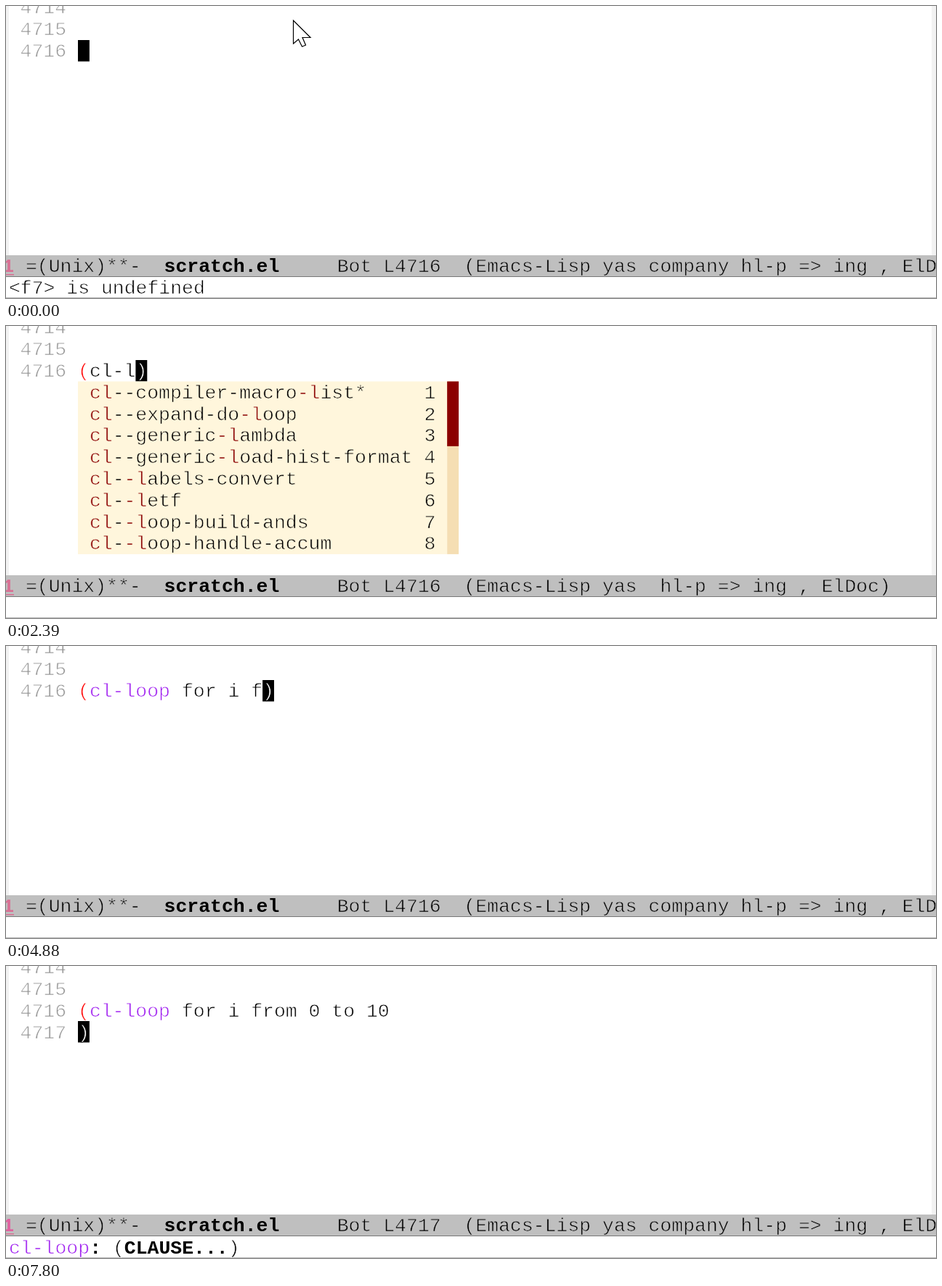
An HTML page for the animation above (8 s loop, 1280 by 403 pixels).

```html
<!DOCTYPE html>
<html lang="en">
<head>
<meta charset="utf-8">
<title>Editor completion</title>
<style>
  html, body { margin: 0; width: 100%; height: 100%; overflow: hidden; background: #fff; }
  svg { display: block; width: 1280px; height: 403px; }
  /* A thin outline in the background colour gives regular text its light weight. */
  text { font: 26.46px "Liberation Mono", monospace; white-space: pre; stroke-width: .75px; }
  .bold { font-weight: bold; stroke: none; }
  rect { stroke: none; }
</style>
</head>
<body>
<svg id="stage" viewBox="0 0 1280 403"></svg>
<script>
const LOOP = 8000, CW = 15.88, ROW = 29.8, LEFT = 99, TOP = 46.7;
const PURPLE = '#a020f0', DARK_RED = '#8b0000', CREAM = '#fff6dc', GREY = '#bfbfbf';
const stage = document.getElementById('stage');

// Moment at which each character of CODE is typed, after the opening parenthesis.
const CODE = 'cl-loop for i from 0 to 10';
const KEYS = [1190, 1320, 2120, 2390, 2580, 2710, 2970, 3430,
  3630, 3740, 3850, 3960, 4500, 4630, 4880, 5080, 5150,
  5350, 5460, 5570, 5680, 5890, 6010, 6150, 7140, 7340];
const HIDE_MOUSE = 790, OPEN = 860, POPUP = 2390, NARROW = 2580, FINAL = 2710,
  KEYWORD = 2970, CLOSE = 3430, DOC = 6680, NEWLINE = 7800;

const LISTS = {
  first: ['cl--compiler-macro-list*', 'cl--expand-do-loop', 'cl--generic-lambda',
    'cl--generic-load-hist-format', 'cl--labels-convert', 'cl--letf',
    'cl--loop-build-ands', 'cl--loop-handle-accum'],
  second: ['cl--expand-do-loop', 'cl--generic-load-hist-format', 'cl--loop-build-ands',
    'cl--loop-handle-accum', 'cl--loop-let', 'cl--loop-set-iterator-function',
    'cl--parse-loop-clause', 'cl-load-time-value'],
  third: ['cl--expand-do-loop', 'cl--loop-build-ands', 'cl--loop-handle-accum',
    'cl--loop-let', 'cl--loop-set-iterator-function', 'cl--parse-loop-clause', 'cl-loop']
};

const esc = s => s.replace(/&/g, '&amp;').replace(/</g, '&lt;').replace(/>/g, '&gt;');
const rect = (x, y, w, h, fill) => `<rect x="${x}" y="${y}" width="${w}" height="${h}" fill="${fill}"/>`;
const text = (x, y, s, fill = '#000', cls = '') =>
  `<text x="${x}" y="${y}" fill="${fill}" class="${cls}">${esc(s)}</text>`;
const on = (background, content) => `<g stroke="${background}">${content}</g>`;
const colX = n => LEFT + n * CW;
const baseline = row => 70 + row * ROW;

function cursor(col, row, char) {
  return rect(colX(col), Math.floor(TOP + row * ROW + 0.3), CW, 29.5, '#000') +
    on('#000', text(colX(col), baseline(row), char, '#fff'));
}

function popup(names, query, thumb) {
  const cols = Math.max(...names.map(n => n.length)) + 4;
  const y = TOP + ROW, h = names.length * ROW, tail = query.slice(2);
  let out = rect(LEFT, y, cols * CW, h, CREAM);
  if (thumb) {
    out += rect(colX(cols), y, CW, h, '#f5deb3') + rect(colX(cols), y, CW, thumb * ROW, DARK_RED);
  }
  names.forEach((name, i) => {
    const by = baseline(i + 1), at = name.indexOf(tail, 2);
    out += text(colX(1), by, 'cl', DARK_RED) +
      text(colX(3), by, name.slice(2, at)) +
      text(colX(1 + at), by, tail, DARK_RED) +
      text(colX(1 + at + tail.length), by, name.slice(at + tail.length)) +
      text(colX(cols - 2), by, String(i + 1));
  });
  return on(CREAM, out);
}

function modeLine(t) {
  const shift = t >= DOC ? -1 : 0, y = 367 + shift, x = n => -4.8 + n * CW;
  const busy = t >= POPUP && t < CLOSE;
  const line = t >= NEWLINE ? 4717 : 4716;
  return on(GREY, rect(0, 344 + shift, 1280, 30, GREY) + rect(0, 373 + shift, 1280, 1, '#777') +
    text(x(0), y, '1', shift ? '#e0609f' : '#d87093', 'bold') +
    rect(0, 370 + shift, 11, 1.5, '#d87093') +
    text(x(2), y, '=(Unix)**-') + text(x(14), y, 'scratch.el', '#000', 'bold') +
    text(x(29), y, `Bot L${line}  (Emacs-Lisp yas ${busy ? '' : 'company'} hl-p => ing , ElDoc)`));
}

function echoArea(t) {
  const y = 397, x = n => 4 + n * CW;
  let out = rect(0, 402, 1280, 1, '#bbb');
  if (t < HIDE_MOUSE) out += text(x(0), y, '<f7> is undefined');
  if (t >= DOC) {
    out += text(x(0), y, 'cl-loop', PURPLE) + text(x(7), y, ':', '#000', 'bold') +
      text(x(9), y, '(') + text(x(10), y, 'CLAUSE...', '#000', 'bold') + text(x(19), y, ')');
  }
  return on('#fff', out);
}

function buffer(t) {
  const typed = CODE.slice(0, KEYS.filter(k => k <= t).length);
  const broken = t >= NEWLINE;
  let out = '';
  for (let row = -2; row <= (broken ? 1 : 0); row++) {
    out += text(colX(-5), baseline(row), String(4716 + row), '#999');
  }
  if (t < OPEN) return on('#fff', out) + cursor(0, 0, '');
  out += text(LEFT, baseline(0), '(', '#f00') +
    text(colX(1), baseline(0), typed.slice(0, 7), t >= KEYWORD ? PURPLE : '#000') +
    text(colX(8), baseline(0), typed.slice(7));
  out = on('#fff', out) + (broken ? cursor(0, 1, ')') : cursor(typed.length + 1, 0, ')'));
  if (t >= POPUP && t < CLOSE) {
    out += t < NARROW ? popup(LISTS.first, typed, 3)
      : t < FINAL ? popup(LISTS.second, typed, 6)
      : popup(LISTS.third, typed, 0);
  }
  return out;
}

function scene(t) {
  const mouse = '<path d="M395.5 20V52L402.5 46L407.5 56L412.5 54L408 43.5H419Z" fill="#fff" stroke="#000" stroke-width="1.2"/>';
  return rect(0, 0, 4, 344, '#f2f2f2') + rect(1274, 0, 6, 344, '#f2f2f2') +
    buffer(t) + modeLine(t) + echoArea(t) + (t < HIDE_MOUSE ? mouse : '');
}

const start = performance.now();
let shown = '';
function draw() {
  const next = scene((performance.now() - start) % LOOP);
  if (next !== shown) stage.innerHTML = shown = next;
  requestAnimationFrame(draw);
}
draw();
</script>
</body>
</html>
```
